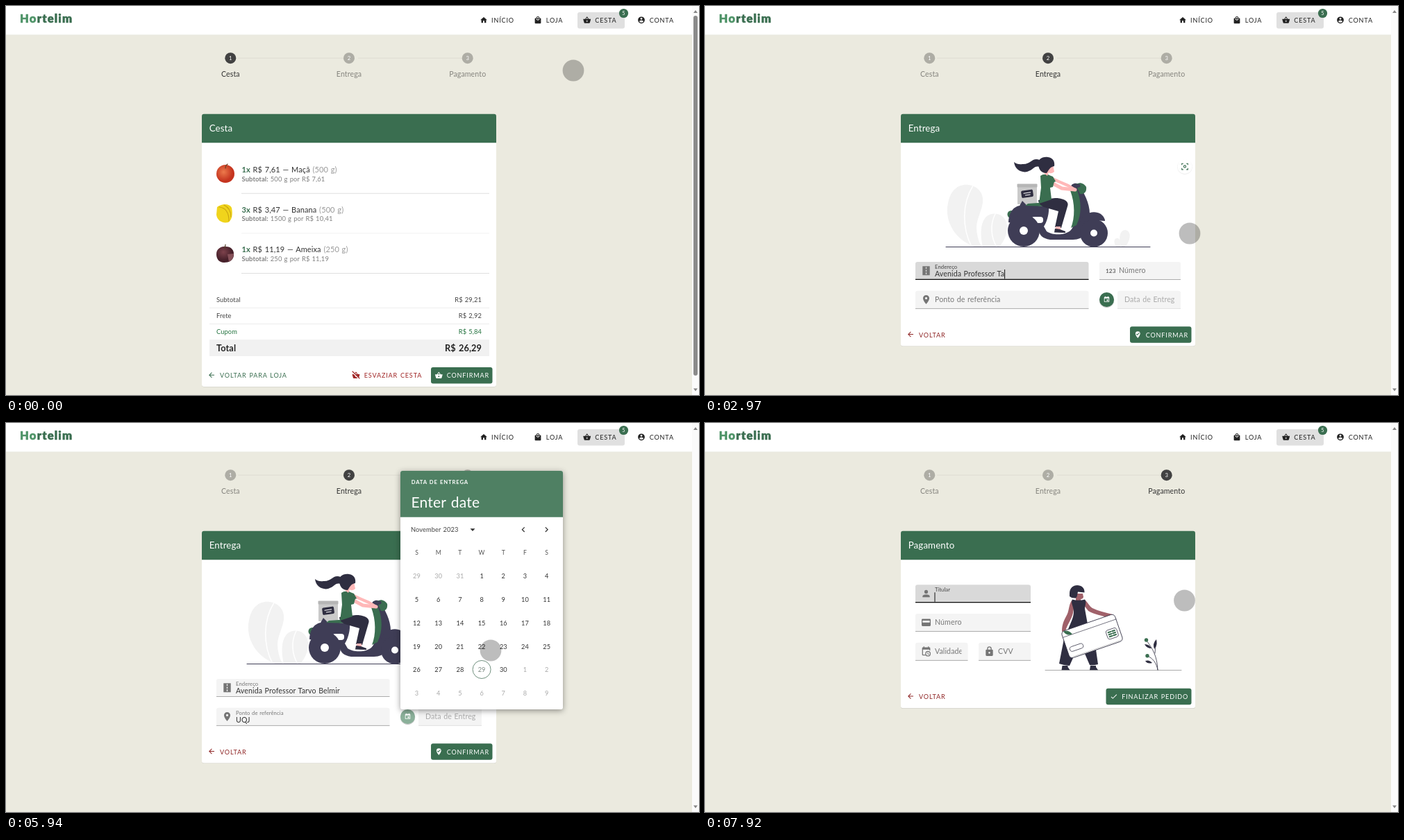
An HTML page for the animation above (8000 ms loop, 998 px wide and 561 px high).

```html
<!DOCTYPE html>
<html lang="pt-BR">
<head>
<meta charset="utf-8">
<title>Cesta</title>
<style>
html, body { margin: 0; width: 100%; height: 100%; overflow: hidden; background: #ebeadf; }
#stage { display: block; width: 100vw; height: 100vh; }
text { font-family: Lato, "Open Sans", sans-serif; letter-spacing: .01em; word-spacing: .07em; white-space: pre; }
.caps { letter-spacing: .83px; }
.mid { text-anchor: middle; }
.end { text-anchor: end; }
.bold { font-weight: 700; }
</style>
</head>
<body>
<svg id="stage" viewBox="0 0 998 561"></svg>
<script>
const LOOP = 8000, STEP = 90;
const GREEN = '#3a6e50', RED = '#8f2626', NAVY = '#3f3d56', INK = '#2f2e41', SKIN = '#ffb8b8', BROWN = '#a0616a';

const icons = {
  home: 'M10,20V14H14V20H19V12H22L12,3L2,12H5V20Z',
  bag: 'M12,13A5,5 0 0,1 7,8H9A3,3 0 0,0 15,8H17A5,5 0 0,1 12,13M12,3A3,3 0 0,1 15,6H9A3,3 0 0,1 12,3M19,6H17A5,5 0 0,0 7,6H5A2,2 0 0,0 3,8V20A2,2 0 0,0 5,22H19A2,2 0 0,0 21,20V8A2,2 0 0,0 19,6Z',
  basket: 'M17.2,9L12.8,2.4Q12,1.6 11.2,2.4L6.8,9H2A1,1 0 0,0 1,10.3L3.6,19.5Q4,21 5.5,21H18.5Q20,21 20.4,19.5L23,10.3A1,1 0 0,0 22,9ZM9,9L12,4.6L15,9ZM12,17A2,2 0 0,1 12,13A2,2 0 0,1 12,17Z',
  user: 'M12,19.2C9.5,19.2 7.3,17.9 6,16C6,14 10,12.9 12,12.9C14,12.9 18,14 18,16C16.7,17.9 14.5,19.2 12,19.2M12,5A3,3 0 0,1 12,11A3,3 0 0,1 12,5M12,2A10,10 0 0,0 12,22A10,10 0 0,0 12,2Z',
  person: 'M12,4A4,4 0 0,1 12,12A4,4 0 0,1 12,4M12,14C16.4,14 20,15.8 20,18V20H4V18C4,15.8 7.6,14 12,14Z',
  back: 'M20,11V13H8L13.5,18.5L12.1,19.9L4.2,12L12.1,4.1L13.5,5.5L8,11Z',
  road: 'M11,16H13V20H11M11,10H13V14H11M11,4H13V8H11M4,22H20V2H4Z',
  pin: 'M12,11.5A2.5,2.5 0 0,1 12,6.5A2.5,2.5 0 0,1 12,11.5M12,2A7,7 0 0,0 5,9C5,14.3 12,22 12,22C12,22 19,14.3 19,9A7,7 0 0,0 12,2Z',
  pinCheck: 'M12,2A7,7 0 0,1 19,9C19,14.3 12,22 12,22C12,22 5,14.3 5,9A7,7 0 0,1 12,2M10.5,14L17,7.4L15.6,6L10.5,11.2L8.4,9.1L7,10.5Z',
  card: 'M20,12H4V8H20M20,4H4A2,2 0 0,0 2,6V18A2,2 0 0,0 4,20H20A2,2 0 0,0 22,18V6A2,2 0 0,0 20,4Z',
  lock: 'M12,17A2,2 0 0,0 12,13A2,2 0 0,0 12,17M18,8A2,2 0 0,1 20,10V20A2,2 0 0,1 18,22H6A2,2 0 0,1 4,20V10A2,2 0 0,1 6,8H7V6A5,5 0 0,1 17,6V8M12,3A3,3 0 0,0 9,6V8H15V6A3,3 0 0,0 12,3Z',
  check: 'M21,7L9,19L3.5,13.5L4.9,12.1L9,16.2L19.6,5.6Z',
  date: 'M19,19H5V8H19M16,1V3H8V1H6V3H5A2,2 0 0,0 3,5V19A2,2 0 0,0 5,21H19A2,2 0 0,0 21,19V5A2,2 0 0,0 19,3H18V1M17,12H12V17H17Z',
  clock: 'M10,19H5V8H19V10H21V5A2,2 0 0,0 19,3H18V1H16V3H8V1H6V3H5A2,2 0 0,0 3,5V19A2,2 0 0,0 5,21H11ZM16,11A6,6 0 0,0 16,23A6,6 0 0,0 16,11M16,13A4,4 0 0,1 16,21A4,4 0 0,1 16,13M15,14V18L18,19.5L18.7,18.2L16.5,17V14Z',
  left: 'M15.4,16.6L10.8,12L15.4,7.4L14,6L8,12L14,18Z',
  right: 'M8.6,16.6L13.2,12L8.6,7.4L10,6L16,12L10,18Z',
  scan: 'M3,8V3H8V5H5V8ZM16,3H21V8H19V5H16ZM3,16H5V19H8V21H3ZM19,16H21V21H16V19H19ZM12,8A4,4 0 0,0 12,16A4,4 0 0,0 12,8M12,10A2,2 0 0,1 12,14A2,2 0 0,1 12,10Z'
};

const text = (x, y, s, size = 10.6, fill = '#333', cls = '') =>
  `<text x="${x}" y="${y}" font-size="${size}" fill="${fill}" class="${cls}">${s}</text>`;
const rect = (x, y, w, h, fill, r = 0) => `<rect x="${x}" y="${y}" width="${w}" height="${h}" fill="${fill}" rx="${r}"/>`;
const dot = (x, y, r, fill, more = '') => `<circle cx="${x}" cy="${y}" r="${r}" fill="${fill}" ${more}/>`;
const path = (d, fill) => `<path d="${d}" fill="${fill}"/>`;
const line = (d, color, w = 1) => `<path d="${d}" fill="none" stroke="${color}" stroke-width="${w}" stroke-linecap="round" stroke-linejoin="round"/>`;
const icon = (name, x, y, size, fill) =>
  `<path d="${icons[name]}" fill="${fill}" fill-rule="evenodd" transform="translate(${x - size / 2} ${y - size / 2}) scale(${size / 24})"/>`;

// Motion
const clamp = v => Math.min(1, Math.max(0, v));
const bez = (s, a, b) => 3 * (1 - s) ** 2 * s * a + 3 * (1 - s) * s * s * b + s ** 3;
function ease(p) {
  let lo = 0, hi = 1;
  for (let i = 0; i < 20; i++) {
    const m = (lo + hi) / 2;
    bez(m, .25, .5) < clamp(p) ? lo = m : hi = m;
  }
  return p <= 0 ? 0 : p >= 1 ? 1 : bez(lo, .8, 1);
}
const pageAt = t => ease((t - 940) / 300) + ease((t - 6747) / 300);

const route = [
  [0, 817, 93], [150, 817, 93], [900, 660, 535], [1250, 666, 535], [1350, 666, 535], [1900, 698, 328],
  [5980, 698, 328], [6170, 716, 356], [6260, 716, 356], [6620, 652, 488], [6750, 652, 488],
  [6930, 652, 479], [7000, 652, 479], [7600, 690.5, 256], [LOOP, 690.5, 256]
];
function pointer(t) {
  const i = route.findIndex(k => k[0] > t), [t0, x0, y0] = route[i - 1], [t1, x1, y1] = route[i];
  const p = (t - t0) / (t1 - t0), s = p * p * (3 - 2 * p);
  return dot(x0 + (x1 - x0) * s, y0 + (y1 - y0) * s, 15.4, '#00000042');
}

// Form fields
const inputs = {
  street: { focus: 1890, blur: 3560, type: 1960, pace: 50, value: 'Avenida Professor Tarvo Belmir' },
  number: { focus: 3600, blur: 4300, type: 3700, pace: 120, value: '23' },
  place: { focus: 4320, blur: 5580, type: 4650, pace: 120, value: 'UQJ' },
  date: { focus: LOOP, blur: LOOP, type: 6230, pace: 1, value: '30/11/2023' },
  holder: { focus: 7650, blur: LOOP, type: LOOP, pace: 1, value: '' }
};
const pen = document.createElement('canvas').getContext('2d');
pen.font = '10.6px Lato, "Open Sans", sans-serif';
const widthOf = s => pen.measureText(s).width + s.length * .106 + (s.split(' ').length - 1) * .74;

function field(t, x, y, w, label, mark, name) {
  const f = inputs[name], on = f && t >= f.focus && t < f.blur;
  const value = f ? f.value.slice(0, Math.max(0, Math.floor((t - f.type) / f.pace))) : '';
  const pad = mark ? 28 : 10, faint = !mark;
  let out = path(`M${x},${y + 26}v-23q0,-3 3,-3h${w - 6}q3,0 3,3v23z`, on ? '#d9d9d9' : '#f4f4f4');
  out += rect(x, y + (on ? 24.7 : 25.2), w, on ? 1.3 : .8, on ? '#111' : faint ? '#ddd' : '#999');
  if (mark === '123') out += text(x + 9, y + 15.5, mark, 8.2, '#666', 'bold');
  else if (mark) out += icon(mark, x + 15.5, y + 12.7, 15.6, '#757575');
  const inner = on || value
    ? text(0, 10, label, 7.7, on ? '#444' : '#777') + text(0, 21, value)
    : text(0, 16.4, label, 10.6, faint ? '#aaa' : '#777');
  out += `<svg x="${x + pad}" y="${y}" width="${w - pad - 9}" height="25">${inner}</svg>`;
  if (on && (t - f.focus) % 1000 < 500) out += rect(x + pad - .5 + widthOf(value), y + 11, 1, 13.5, '#111');
  return out;
}

const back = (y, label, fill) => icon('back', 296, y - .5, 12, fill) + text(308, y + 3.6, label, 9.1, fill, 'caps');
const confirm = (x, y, label, mark) => rect(x, y, 700.5 - x, 23.5, GREEN, 3) +
  icon(mark, x + 11.3, y + 11.7, 11.7, '#fff') + text(x + 22.7, y + 15.2, label, 9.1, '#fff', 'caps');
const card = (title, bottom, body) => rect(282, 157, 424, bottom - 156.4, '#0002', 3) +
  rect(282, 156, 424, bottom - 156, '#fff', 3) +
  path('M282,197.3v-38.5q0,-3 3,-3h418q3,0 3,3v38.5z', GREEN) + text(292.7, 181, title, 13.3, '#fff') + body;

// Basket page
const fruits = [
  dot(316, 242, 13, 'url(#apple)') + line('M316,234q0,-4 3,-6', '#6b4426', 1.2),
  path('M304,290C312,284 322,285 325,291C327,301 325,309 320,312C311,314 304,309 303,301Z', '#f0d41c') +
    line('M307,290C317,291 321,299 321,310M314,287Q324,292 324,304', '#c9a412', 1.1),
  path('M303,358C303,350 310,346 317,347C325,347 329,353 328,360C327,367 321,370 314,370C307,370 303,365 303,358Z', 'url(#plum)') +
    path('M319,358l9,-1q0,8 -7,12z', '#87525a') + line('M315,350L316,344', '#54402c', 1.2)
];
const goods = [['1x', '7,61', 'Maçã', '500 g', '500 g', '7,61'], ['3x', '3,47', 'Banana', '500 g', '1500 g', '10,41'],
  ['1x', '11,19', 'Ameixa', '250 g', '250 g', '11,19']];
const sums = [['Subtotal', '29,21', '#444'], ['Frete', '2,92', '#444'], ['Cupom', '5,84', '#23733f']];

function basketPage() {
  let out = '';
  goods.forEach(([count, price, name, unit, amount, total], i) => {
    const y = 240 + i * 57.6;
    out += fruits[i] +
      text(339.5, y, `<tspan class="bold" fill="${GREEN}">${count}</tspan> R$ ${price} — ${name} <tspan fill="#999">(${unit})</tspan>`, 11) +
      text(339.5, y + 12.7, `<tspan class="bold">Subtotal:</tspan> ${amount} por R$ ${total}`, 9.4, '#808080') +
      rect(339, y + 29.8, 357, .9, i === 1 ? '#f1f1f1' : '#dcdcdc');
  });
  sums.forEach(([name, value, fill], i) => {
    const y = 426.7 + i * 23.3;
    out += text(303, y, name, 9.3, fill) + text(685, y, 'R$ ' + value, 9.3, fill, 'end') + rect(293, y + 8.2, 403, .8, '#e8e8e8');
  });
  out += rect(293, 482, 403, 23, '#f1f1f1') + text(303, 498, 'Total', 12.7, '#222', 'bold') +
    text(685, 498, 'R$ 26,29', 12.7, '#222', 'bold end');
  out += back(532.7, 'VOLTAR PARA LOJA', GREEN) + icon('basket', 504, 532.5, 11.7, '#a02626') +
    line('M499,528L509,538', '#fff', 2.2) + line('M499,527L509,537', '#a02626', 1.1) +
    text(515.7, 536.3, 'ESVAZIAR CESTA', 9.1, '#a02626', 'caps') + confirm(612, 521, 'CONFIRMAR', 'basket');
  return card('Cesta', 549, out);
}

// Delivery page
const scooter =
  path('M388,347C362,338 344,312 350,284C354,264 366,256 380,258C393,260 402,270 400,284C398,296 392,306 391,318Q391,334 398,347Z', '#f2f2f2') +
  path('M400,347C396,330 396,312 406,303C416,296 430,300 434,312C438,326 430,340 424,347Z', '#f2f2f2') +
  path('M592,347C587,339 590,334 595,335Q600,338 598,347ZM600,347C595,335 597,324 605,323C613,324 613,333 610,339Q608,345 604,347Z', '#f2f2f2') +
  line('M386,259C370,285 370,320 384,347M418,300C410,315 412,335 420,347', '#fff', 1.5) +
  line('M347,347.5H641', NAVY) +
  rect(450, 257, 28, 29, '#cacaca', 1) + rect(449.5, 256.5, 29, 5, '#b6b6b6', 1) +
  `<g transform="rotate(-8 464 270.5)">${rect(455.5, 265.5, 17, 10.5, INK, 2)}${line('M459,269.5h10M461,272.5h7', '#fff')}</g>` +
  dot(441, 300.5, 5.5, GREEN) +
  path('M437,312C438,294 447,289 453,288L457,281L463,287L495,289C496,300 492,312 488,318L492,325C500,331 520,331 527,323C536,312 535,285 527,264C525,257 533,254 538,257C546,270 555,285 554,303C554,326 545,337 530,337H497C486,335 481,331 480,320Z', NAVY) +
  rect(470, 304, 17, 9, '#fff', 4) + path('M461,288L465,285L494,283L496,289Z', GREEN) +
  path('M526,266C533,285 533,305 527,320L535,316C543,300 542,281 536,266Z', GREEN) +
  dot(459, 324, 23, NAVY) + dot(459, 324, 6, '#fff') +
  path('M540,312C545,298 560,294 570,300Q576,305 576,310L560,309Z', NAVY) +
  dot(560, 327.5, 20, NAVY) + dot(560, 327.5, 5, '#fff') +
  path('M534,258C538,253 546,255 549,261C550,268 546,272 540,271Z', GREEN) + line('M527,263L538,259', NAVY, 5) +
  path('M480,280L504,277C516,277 525,281 522,289L513,320L504,319L509,296L488,290Q480,286 480,280Z', INK) +
  path('M505,318h7v5h-7z', SKIN) + path('M503,326.5L504,321L511,322L519,325V327Z', INK) +
  line('M499,255L514,263L533,265', SKIN, 5) +
  path('M483,245Q488,241 496,244L503,253L501,261L497,262L499,279L481,285L484,262Z', GREEN) +
  line('M500,249L523,259L533,265', SKIN, 4.2) + path('M493,243L501,246L505,253L496,257Z', GREEN) +
  path('M491,229h10l2,10q-5,4 -8,1l-2,5l-5,-4z', SKIN) +
  path('M480,229C479,221 485,217 494,218C501,219 504,224 503,231C497,232 496,235 492,241C485,241 481,237 480,229Z', INK) +
  path('M482,222C470,218 470,229 457,228Q450,229 445,225C446,235 455,241 464,239C474,236 473,230 482,232Z', INK);

function deliveryPage(t) {
  const busy = t >= 5580 && t < 6300, hover = t >= 1710 && t < 6200;
  let out = scooter;
  if (hover) out += dot(691, 232.2, 10.8, '#0001') + dot(691, 231.5, 10.5, '#fff') + icon('scan', 691, 231.5, 13, GREEN);
  out += field(t, 303, 369, 249.5, 'Endereço', 'road', 'street') + field(t, 568, 369, 117, 'Número', '123', 'number') +
    field(t, 303, 410.7, 249.5, 'Ponto de referência', 'pin', 'place') + field(t, 594, 410.7, 91, 'Data de Entrega', '', 'date') +
    dot(578.5, 424.5, 10.7, '#0003') + dot(578.5, 423.5, 10.5, busy ? '#8bb09a' : GREEN) + icon('date', 578.5, 423.3, 10, '#fff');
  return card('Entrega', 490.5, out + back(474, 'VOLTAR', RED) + confirm(612, 462.3, 'CONFIRMAR', 'pinCheck'));
}

function calendar() {
  let out = rect(568, 69, 234, 344, '#fff', 3) + path('M568,135.7v-63.7q0,-3 3,-3h228q3,0 3,3v63.7z', '#4f8063') +
    text(583.7, 88, 'DATA DE ENTREGA', 7.7, '#fff', 'caps bold') + text(583.5, 122, 'Enter date', 21, '#fff') +
    text(583, 157, 'November 2023', 9.3, '#444') + path('M668.5,152.3h7l-3.5,3.8z', '#333') +
    icon('left', 745, 153.7, 15, '#333') + icon('right', 778.5, 153.7, 15, '#333');
  [...'SMTWTFS'].forEach((d, i) => out += text(591.5 + i * 31.2, 190.3, d, 8.6, '#555', 'mid'));
  for (let i = 0; i < 42; i++) {
    const day = i - 2, inside = day > 0 && day < 31;
    const x = 591.5 + i % 7 * 31.2, y = 220.8 + Math.floor(i / 7) * 33.8;
    if (day === 29) out += dot(x, y - .5, 13, 'none', 'stroke="#6f8f7d"');
    out += text(x, y + 3.3, day < 1 ? day + 31 : inside ? day : day - 30, 9.2, !inside ? '#aaa' : day === 29 ? '#7c8a82' : '#333', 'mid');
  }
  return `<g style="filter:drop-shadow(0 2px 4px #0006)">${out}</g>`;
}

// Payment page
const buyer =
  line('M490,356.5H686', '#aaa') +
  path('M518,306L534,330L525,350Q518,350 510,347ZM545,328L562,320L566,348Q559,350 554,349Z', INK) +
  path('M514.5,350h8v2l3,4.3h-12zM555,350h8v2l3,4.3h-12z', INK) +
  path('M534,246h10l1,5q-1,3 -4,3l1,4h-8z', BROWN) +
  path('M528,256C523,264 525,271 520,279C515,288 514,294 514,301L519,300C522,290 528,283 530,274L532,262Z', BROWN) +
  path('M546,255C551,257 553,264 558,267C566,271 576,273 587,276L583,281C572,278 560,276 552,271L545,262Z', BROWN) +
  path('M529,254.5Q538,257 547,254.5C550,257 547,264 547,268L551,290L530,301H522C525,290 531,282 531,272C531,265 526,259 529,254.5Z', INK) +
  path('M525,246C525,238 530,234 536,234C542,234 547,238 546.5,244.5L537,243.5C536,248 536,251 534,252.5Q528,253 525,250Z', INK) +
  `<g transform="rotate(-19 557.5 307.5)">
    <rect x="517" y="287" width="81" height="41" rx="5" fill="#fff" stroke="${INK}" stroke-width=".8"/>
    ${line('M517,295.5H598', INK, .6)}${line('M521,326.5H594', '#bbb', .7)}
    <rect x="521" y="312" width="20" height="7" rx="3.5" fill="#fff" stroke="${INK}" stroke-width=".7"/>
    <rect x="578" y="306.5" width="16" height="13.5" rx="3" fill="#fff" stroke="${INK}" stroke-width=".7"/>
    ${line('M581,310h4M587,310h4M581,313.2h4M587,313.2h4M581,316.4h4M587,316.4h4', GREEN, 2)}</g>` +
  path('M516,300.5Q524,298 529,304.5Q521,308 516,300.5Z', GREEN) +
  line('M652,356C651,336 645,326 636,314M652,356C650,346 645,339 637,336M648,332Q648,324 650,318', INK, .8) +
  dot(635.5, 313, 2.7, GREEN) + dot(637, 335.8, 2.7, GREEN) +
  path('M647,326Q644,318 650,312Q652,320 647,326ZM643,325Q636,325 633,319Q640,319 643,325ZM644,346Q637,348 634,343Q640,341 644,346Z', INK);

const paymentPage = t => card('Pagamento', 411.3, buyer +
  field(t, 303, 233.3, 166, 'Títular', 'person', 'holder') + field(t, 303, 275, 166, 'Número', 'card') +
  field(t, 303, 316.7, 75.5, 'Validade', 'clock') + field(t, 394, 316.7, 75, 'CVV', 'lock') +
  back(394.5, 'VOLTAR', RED) + confirm(577.5, 382.7, 'FINALIZAR PEDIDO', 'check'));

// Frame around the pages
const shell = rect(0, 0, 998, 561, '#ebeadf') + rect(0, 41, 988, 1, '#e6e5db') + rect(0, 0, 988, 41.4, '#fff') +
  `<text x="20" y="24.3" font-size="16.6" font-weight="900" style="letter-spacing:1.2px" fill="${GREEN}" stroke="${GREEN}" stroke-width=".5" stroke-linejoin="round"><tspan fill="#4f9468" stroke="#4f9468">Ho</tspan>rtelim</text>` +
  rect(823, 9, 68, 23.5, '#e0e0e0', 3) +
  [['home', 688, 'INÍCIO', 699], ['bag', 766, 'LOJA', 777.7], ['basket', 836.7, 'CESTA', 848.3], ['user', 915, 'CONTA', 926.7]]
    .map(([mark, x, label, tx]) => icon(mark, x, 20.3, 11.7, '#222') + text(tx, 24, label, 9.1, '#222', 'caps')).join('') +
  dot(889.5, 10.5, 6.6, GREEN) + text(889.5, 13.2, '5', 7.5, '#fff', 'mid') +
  rect(988, 0, 10, 561, '#fbfbfb') + path('M990,10h6l-3,-4zM990,551.5h6l-3,4z', '#858585');

const steps = active => rect(334, 74.7, 152, .9, '#dcdbd1') + rect(507, 74.7, 150, .9, '#dcdbd1') +
  ['Cesta', 'Entrega', 'Pagamento'].map((label, i) => {
    const x = 323.3 + i * 170.7, on = i === active;
    return dot(x, 75.2, 8, on ? '#424242' : '#aeada5') + text(x, 78, i + 1, 7.7, '#fff', 'mid') +
      text(x, 102, label, 10.6, on ? '#333' : '#85847e', 'mid');
  }).join('');

const defs = `<defs>
  <radialGradient id="apple" cx=".4" cy=".4"><stop stop-color="#ec7a4c"/><stop offset="1" stop-color="#c5341f"/></radialGradient>
  <radialGradient id="plum" cx=".4" cy=".35"><stop stop-color="#7d424c"/><stop offset="1" stop-color="#46202a"/></radialGradient>
</defs>`;
const pages = [basketPage, deliveryPage, paymentPage], bottoms = [549, 490, 411];

function scene(t) {
  const pos = pageAt(t), i = Math.floor(pos), part = pos - i;
  const bottom = bottoms[i] + part * ((bottoms[i + 1] || bottoms[i]) - bottoms[i]);
  const shown = pages.map((page, n) => Math.abs(n - pos) < 1 ? `<g transform="translate(${Math.round((n - pos) * 424)})">${page(t)}</g>` : '').join('');
  return defs + shell + (pos < .9 ? rect(990, 14, 6, 519, '#8b8b8b', 3) : '') + steps(Math.ceil(pos)) +
    `<svg x="282" y="155" width="424" height="${bottom - 154}" viewBox="282 155 424 ${bottom - 154}">${shown}</svg>` +
    (t >= 5940 && t < 6300 ? calendar() : '') + pointer(t);
}

const stage = document.getElementById('stage');
let last = -1;
function tick() {
  const t = Math.floor(performance.now() % LOOP / STEP) * STEP;
  if (t !== last) stage.innerHTML = scene(last = t);
  requestAnimationFrame(tick);
}
tick();
</script>
</body>
</html>
```
